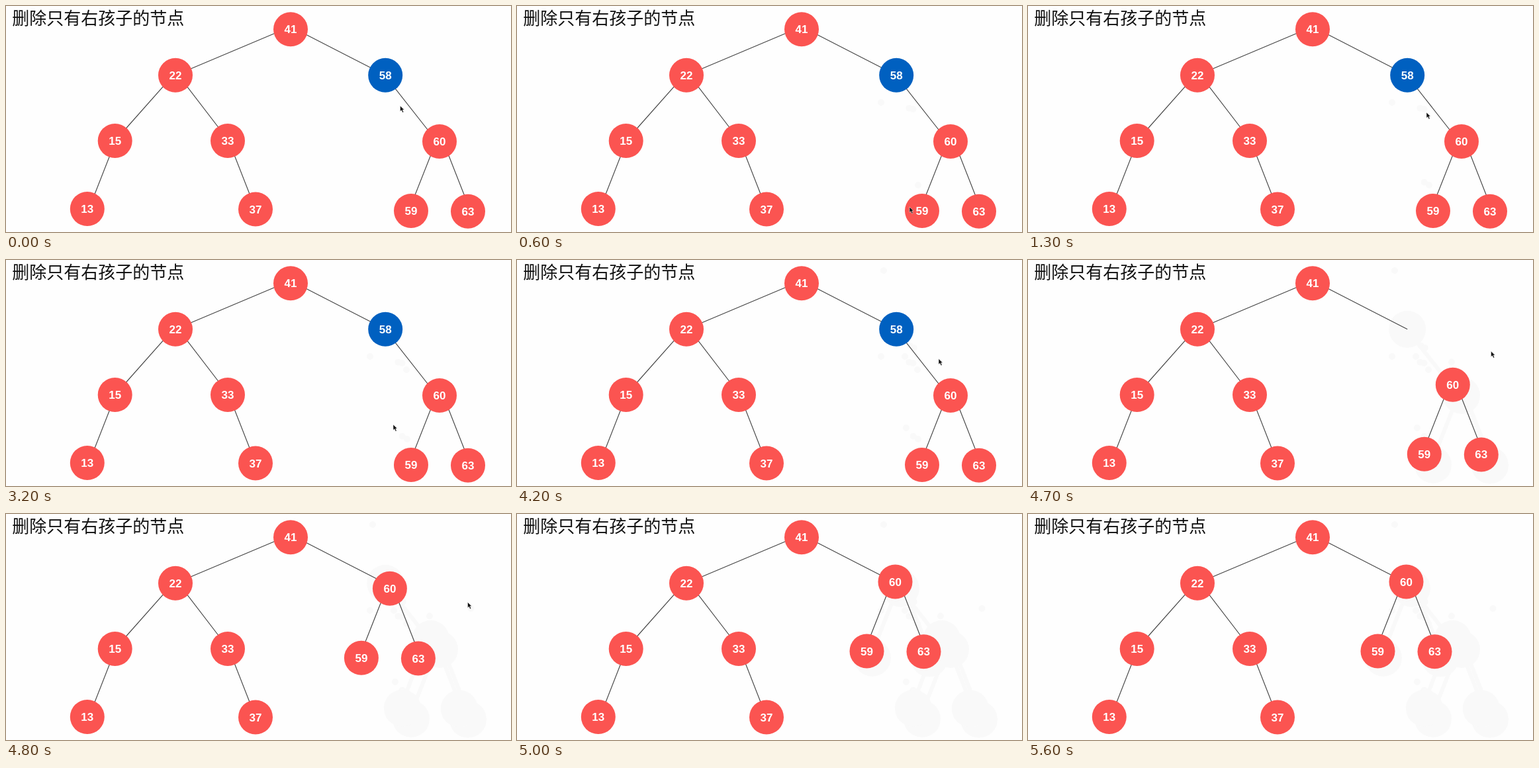
An HTML page that plays this animation: 763x342 px, repeating every 5800 ms.

```html
<!DOCTYPE html>
<html lang="zh-CN">
<head>
<meta charset="utf-8">
<title>删除节点</title>
<style>
  html, body { margin: 0; width: 100%; height: 100%; overflow: hidden; background: #fefefe; }
  svg { display: block; width: 100%; height: 100%; }
  line { stroke: #444; stroke-width: 1.15; }
  circle { fill: #fb5451; }
  #removed circle { fill: #0060c0; }
  text { font: bold 17px "Liberation Sans", Arial, sans-serif; fill: #fff; text-anchor: middle; }
  .title { font: 26px "Noto Sans CJK SC", "Noto Sans CJK", sans-serif; fill: #111; text-anchor: start; }
  #trail circle { fill: #f9f9f9; }
  #trail line { stroke: #f9f9f9; stroke-width: 6; }
  #trail text { display: none; }
</style>
</head>
<body>
<svg viewBox="0 0 763 342">
  <g id="trail"></g>
  <text class="title" x="9.2" y="28.3">删除只有右孩子的节点</text>
  <g id="tree"></g>
  <g id="removed"></g>
  <g id="subtree"></g>
  <path id="cursor" d="M0 0V8.4L2 6.7L3.6 10.2L5.2 9.5L3.7 6.1H6.2Z"
        fill="#111" stroke="#fff" stroke-width=".5"/>
</svg>
<script>
const LOOP = 5800, POINTER_END = 5000;
const PORT = 4; // edges leave a parent slightly above its centre

// value, centre, parent, sideways nudge of the edge, layer
const nodes = [
  [41, 430, 35.3, 0, 0, 'tree'],
  [22, 256, 104.8, 41, 0, 'tree'],
  [15, 164.7, 204, 22, 0, 'tree'],
  [33, 335, 204, 22, 1.5, 'tree'],
  [13, 122.8, 307, 15, 2.5, 'tree'],
  [37, 377, 307.5, 33, 0, 'tree'],
  [58, 573.2, 104.8, 41, 0, 'removed'],
  [60, 655, 205, 58, -4, 'subtree'],
  [59, 612, 310, 60, -3.5, 'subtree'],
  [63, 698, 310.7, 60, 4, 'subtree']
].map(([value, x, y, parent, nudge, layer]) => ({ value, x, y, parent, nudge, layer }));

// The pointer travels to x, y between two times and rests in between.
const strokes = [
  [100, 300, 547, 141], [400, 500, 603, 266], [500, 600, 593, 304],
  [1000, 1300, 602, 161], [3100, 3200, 585, 249], [3200, 3300, 551, 11],
  [3400, 3500, 583, 141], [3500, 3600, 591, 125], [4000, 4200, 637, 149.5],
  [4300, 4400, 699.5, 138], [4700, 4800, 697.5, 133.5]
];

const $ = id => document.getElementById(id);
const progress = (t, from, to) => Math.min(1, Math.max(0, (t - from) / (to - from)));
const easeInOut = p => p < 0.5 ? 4 * p ** 3 : 1 - 4 * (1 - p) ** 3;
const shift = (x, y) => `translate(${x} ${y})`;

function add(parent, tag, attrs, text = '') {
  const el = document.createElementNS('http://www.w3.org/2000/svg', tag);
  for (const key in attrs) el.setAttribute(key, attrs[key]);
  el.textContent = text;
  return parent.appendChild(el);
}

// A layer holds its nodes and the edges that leave them.
function drawLayer(group, layer, r) {
  const own = nodes.filter(n => n.layer === layer);
  for (const { value, x, y } of own)
    for (const child of nodes.filter(n => n.parent === value))
      add(group, 'line', { x1: x + child.nudge, y1: y - PORT, x2: child.x + child.nudge, y2: child.y });
  for (const { value, x, y } of own) {
    add(group, 'circle', { cx: x, cy: y, r });
    add(group, 'text', { x, y: y + 6 }, value);
  }
}

// The picture advances in beats, slower at the end.
function beat(t) {
  const step = t < 4800 ? 100 : 200;
  return Math.floor(t / step) * step;
}

function pointerAt(t) {
  let x = 595.5, y = 151;
  for (const [from, to, toX, toY] of strokes) {
    const p = progress(t, from, to) ** 3;
    x += (toX - x) * p;
    y += (toY - y) * p;
  }
  return shift(x, y);
}

function slideAt(t) {
  const k = easeInOut(progress(t, 4607, 4880));
  return shift(-83.5 * k, -102.5 * k);
}

const fadeAt = t => 1 - progress(t, 4400, 4600);

// Whatever moves away leaves a faint mark behind.
const marks = [];
function mark(from, transform, fill) {
  const el = add($('trail'), 'g', { transform });
  fill(el);
  marks.push({ from, el });
}

function buildTrail() {
  const movers = [
    [pointerAt, g => add(g, 'circle', { cx: 3, cy: 5, r: 5 })],
    [slideAt, g => drawLayer(g, 'subtree', 28)]
  ];
  for (const [place, fill] of movers)
    for (let t = 100; t <= POINTER_END; t += 100) {
      const before = place(beat(t - 100));
      if (place(beat(t)) !== before) mark(t, before, fill);
    }
  mark(4600, shift(0, 0), g => drawLayer(g, 'removed', 28));
}

function draw(time) {
  const t = beat(time);
  $('cursor').setAttribute('transform', pointerAt(t));
  $('cursor').setAttribute('visibility', t < POINTER_END ? 'visible' : 'hidden');
  $('removed').setAttribute('opacity', fadeAt(t));
  $('subtree').setAttribute('transform', slideAt(t));
  for (const { from, el } of marks)
    el.setAttribute('visibility', t >= from ? 'visible' : 'hidden');
}

for (const layer of ['tree', 'removed', 'subtree']) drawLayer($(layer), layer, 26);
buildTrail();

const start = performance.now();
function tick() {
  draw((performance.now() - start) % LOOP);
  requestAnimationFrame(tick);
}
tick();
</script>
</body>
</html>
```
